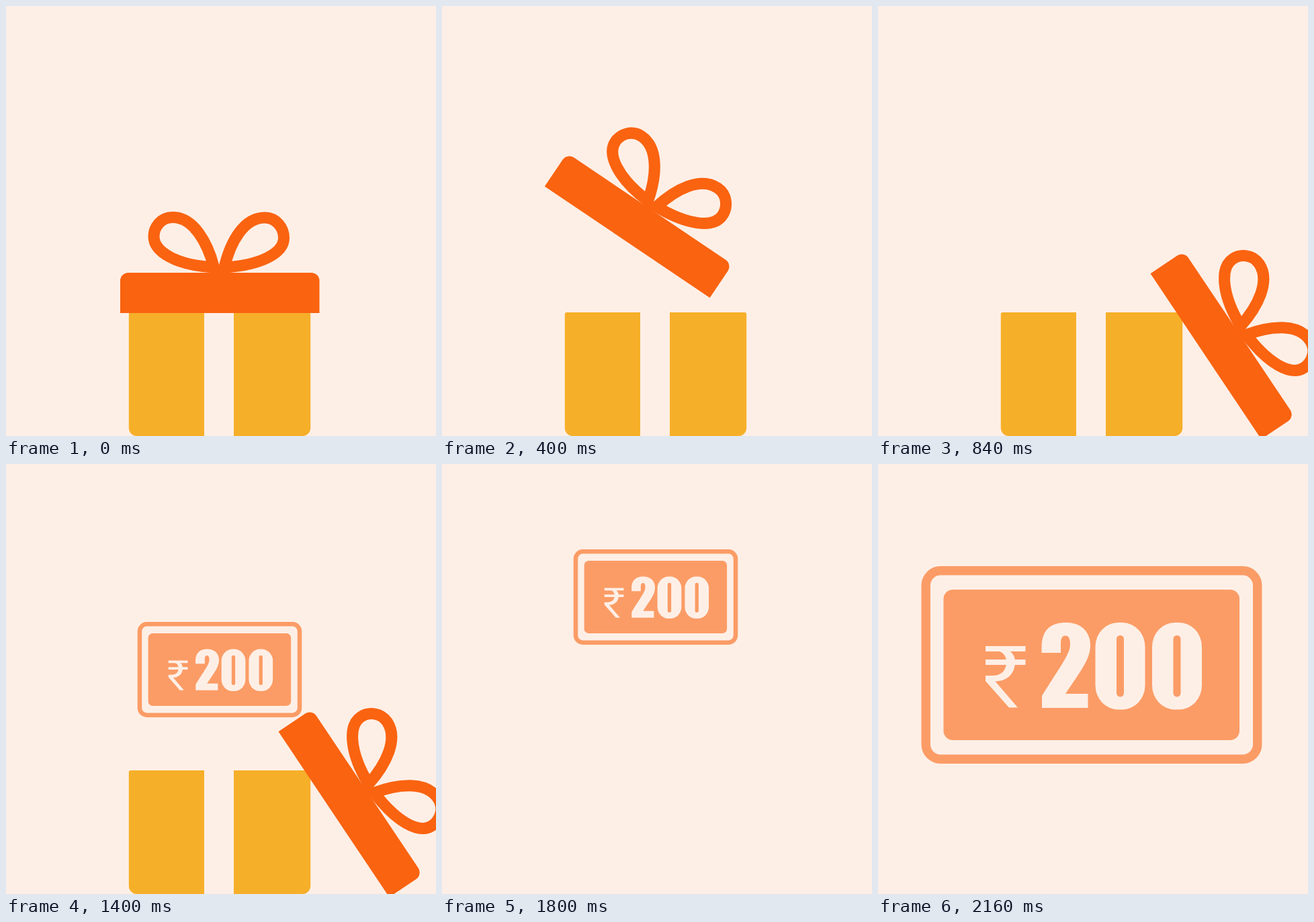
Recreate the animation shown at these times as an HTML page. Size 640 by 640 pixels, loop 2.48 s.

```html
<!DOCTYPE html>
<html lang="en">
<head>
<meta charset="utf-8">
<title>Gift box</title>
<style>
  html, body { margin: 0; width: 100%; height: 100%; overflow: hidden; background: #feefe6; }
  svg { display: block; width: 100%; height: 100%; }
  .paper { fill: #feefe6; }
  .card { fill: #fb9c66; }
  .edge { fill: none; stroke: #fb9c66; stroke-width: 13.5; }
  .box { fill: #f6af29; }
  .lid { fill: #fa6310; }
  .bow { fill: none; stroke: #fa6310; stroke-width: 17; }
</style>
</head>
<body>
<svg viewBox="0 0 640 640" role="img" aria-label="A gift box opens and a ₹ 200 voucher comes out">
  <g id="box">
    <path class="box" d="M186 456H450.200a3 3 0 0 1 3 3V628a12 12 0 0 1 -12 12H194.800a12 12 0 0 1 -12 -12V459a3 3 0 0 1 3 -3Z"/>
    <rect class="paper" x="295" y="455" width="44" height="186"/>
  </g>

  <g id="note">
    <g transform="translate(-318 -299)">
      <rect class="edge" x="71.250" y="158.750" width="493.500" height="280.500" rx="22"/>
      <rect class="card" x="97.500" y="187" width="440.500" height="224" rx="14"/>
      <g class="paper">
        <!-- rupee sign -->
        <path d="M160 271H219.500V279H160ZM160 291H219.500V299H160Z"/>
        <path d="M176 278C186 279 191 285 191 295C191 308 183 315 170 315H160V323L195 362.500H208L174.500 323.500C193 323 204 312 204 294C204 287 201 282 195.500 278Z"/>
        <!-- condensed numerals -->
        <path d="M243.500 281V273C243.500 248 256 236 280 236C303 236 316 250 316 270C316 290 303 306 279 342H312.500V363H244V345C270 303 286 283 286 269C286 260 284 255.500 279 255.500C274 255.500 272 260 272 267V281Z"/>
        <rect x="323.500" y="236" width="74" height="129.500" rx="34" ry="36"/>
        <rect x="408" y="236" width="74" height="129.500" rx="34" ry="36"/>
      </g>
      <rect class="card" x="355" y="255" width="11" height="91.500" rx="5.500"/>
      <rect class="card" x="439.500" y="255" width="11" height="91.500" rx="5.500"/>
    </g>
  </g>

  <g id="lid">
    <g transform="translate(-318.250 -381.500)">
      <path class="lid" d="M170 457V409a12 12 0 0 1 12 -12H454.500a12 12 0 0 1 12 12V457Z"/>
      <path class="bow" d="M309.500 389C300 352 279 314.500 248 314.500C230 314.500 220 330 220 343C220 365 252 386 309.500 389Z"/>
      <path class="bow" d="M325 389C334 351 354 315 385 315C403 315 413.500 331 413.500 345C413.500 368 379 386 325 389Z"/>
    </g>
  </g>
</svg>
<script>
  const LOOP = 2480, STEP = 40;
  const [box, note, lid] = ['box', 'note', 'lid'].map(id => document.getElementById(id));

  const track = d => {
    const p = document.createElementNS('http://www.w3.org/2000/svg', 'path');
    p.setAttribute('d', d);
    const length = p.getTotalLength();
    return u => p.getPointAtLength(u * length);
  };
  const lift = track('M318.25 381.5C318.2 366 279.1 272.5 317.9 288.8');
  const drop = track('M317.9 288.8C356.6 305.1 511.9 447.7 550.7 479.5');

  const mix = (a, b, u) => a + (b - a) * u;
  const part = (t, from, to) => Math.min(1, Math.max(0, (t - from) / (to - from)));
  const show = (el, on) => el.setAttribute('visibility', on ? 'visible' : 'hidden');

  function drawLid(t) {
    const up = part(t, 0, 400), down = part(t, 400, 840);
    const p = t < 400 ? lift(up) : drop(down);
    const angle = 34 * up + 22.2 * down;
    lid.setAttribute('transform', `translate(${p.x} ${p.y}) rotate(${angle})`);
  }

  function drawNote(t) {
    const rise = part(t, 1400, 1520), grow = part(t, 1880, 2160);
    const y = mix(mix(306, 198, rise), 299, grow);
    note.setAttribute('transform', `translate(318 ${y}) scale(${mix(0.4824, 1, grow)})`);
  }

  function draw(now) {
    const t = Math.floor((now % LOOP) / STEP) * STEP;
    show(box, t < 1800);
    show(lid, t < 1800);
    show(note, t >= 1400);
    drawLid(t);
    drawNote(t);
  }

  const start = performance.now();
  function tick() {
    draw(performance.now() - start);
    requestAnimationFrame(tick);
  }
  tick();
</script>
</body>
</html>
```
